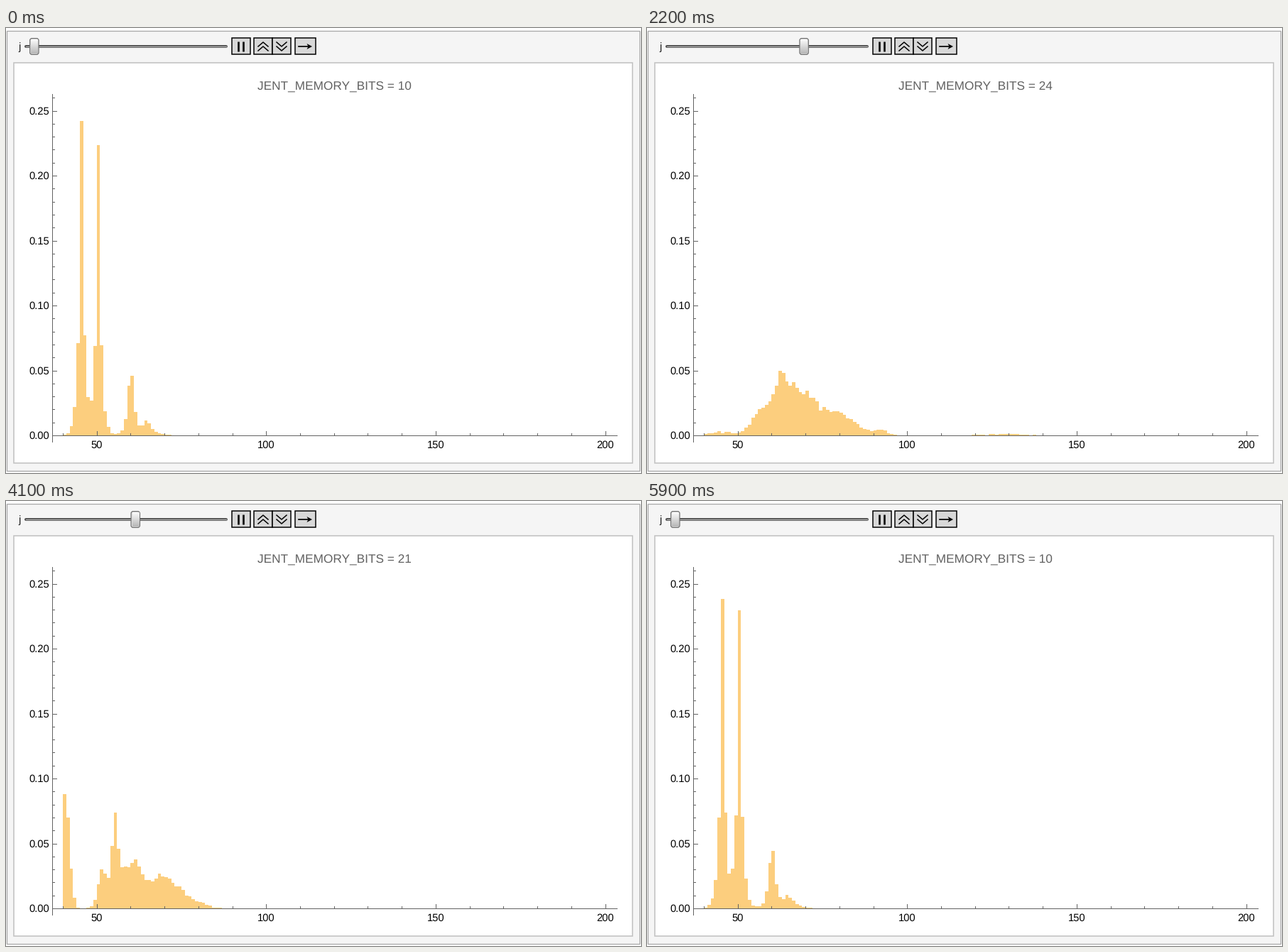
A matplotlib script for the animation above (6000 ms loop, 894 by 627 pixels).

```python
import math

import numpy as np
import matplotlib.pyplot as plt
from matplotlib.animation import FuncAnimation
from matplotlib.patches import FancyBboxPatch, Polygon, Rectangle

W, H, DPI = 894, 627, 100
FRAMES, INTERVAL = 60, 100
PT = 72 / DPI  # points per pixel
FLOOR, AXIS_X = 574, 65
GREY = "#626262"
BINS = np.arange(40, 200)

plt.rcParams["font.family"] = "Liberation Sans"
plt.rcParams["text.hinting"] = "none"


def px(value):
    return 127.7 + (value - 50) * 4.772


def py(prob):
    return FLOOR - prob * 1830


# ---- histogram: a few humps (centre, height in thousandths, width) ----

SPIKES = {
    10: [(45, 240, .83), (50, 225, .85), (59.6, 70, .9), (64.4, 13, 1.8)],
    13: [(40, 65, .5), (42, 27, 1), (47.6, 300, .68), (54, 206, .85),
         (57.5, 20, 1.8), (63, 24, .6), (67, 9, 2)],
    14: [(40, 67, .45), (45, 167, .8), (49.65, 285, .7), (54, 52, .9),
         (59.5, 52, .85), (64, 24, 1.1), (68, 5, 1)],
}
HILLS = {
    21: [(40, 91, 1.35), (51, 22, 1.2), (54.8, 45, .8), (57, 30, 3.4),
         (61.3, 13, 1.3), (65, 14, 4), (70, 15, 3.2), (76, 8, 4)],
    24: [(44, 2.5, 4), (56, 9, 2), (62.2, 14, 1.2), (64.5, 38, 5.6),
         (71, 5, 2), (78.5, 17, 5), (92, 3.5, 2), (128, 1.2, 5)],
    29: [(86, 1.6, 12), (119.7, 26, 1.5), (127.3, 28, 1.7),
         (134.7, 23, 1.8), (142, 17, 1.6), (145, 23, 6.5),
         (156.5, 9, 2.8), (164, 4, 4)],
}


def spike(d):
    return np.exp(-np.abs(d))


def hill(d):
    return np.exp(-d * d / 2)


def add_up(humps, shape):
    return sum(h * shape((BINS - c) / w) for c, h, w in humps)


KNOWN = {bits: add_up(humps, spike) for bits, humps in SPIKES.items()}
KNOWN |= {bits: add_up(humps, hill) for bits, humps in HILLS.items()}


def memory_bits(frame):
    """Hold at 10, climb to 30 and come back down, in whole steps."""
    return 10 + max(0, math.floor(0.84 * (25 - abs(frame - 29.6))))


def profile(bits):
    if bits > 29:
        return np.roll(KNOWN[29], 5)
    low = max(k for k in KNOWN if k <= bits)
    high = min(k for k in KNOWN if k >= bits)
    mix = (bits - low) / max(high - low, 1)
    if low == 24:
        # the share of cache hits halves with every bit
        mix = (1 - 2.0 ** (24 - bits)) / (1 - 2.0 ** -5)
    return (1 - mix) * KNOWN[low] + mix * KNOWN[high]


def heights(frame):
    """Every frame is a fresh sample, so the bars jitter a little."""
    h = profile(memory_bits(frame))
    noise = np.random.default_rng(frame).standard_normal(len(h))
    return np.maximum(h + 0.25 * np.sqrt(h) * noise, 0) / 1000


# ---- stage ----

fig = plt.figure(figsize=(W / DPI, H / DPI), dpi=DPI, facecolor="white")
ax = fig.add_axes([0, 0, 1, 1])
ax.axis("off")


def line(xs, ys, color="black", width=1.0, **kw):
    ax.plot(xs, ys, color=color, lw=width * PT, **kw)


def box(x0, y0, x1, y1, face, edge, width):
    ax.add_patch(Rectangle((x0, y0), x1 - x0, y1 - y0, facecolor=face,
                           edgecolor=edge, lw=width * PT))


def label(x, y, s, size, color="black", ha="center"):
    return ax.text(x, y, s, fontsize=size * PT, color=color, ha=ha,
                   va="baseline", zorder=5)


box(1, 4, 892, 624, "#f5f5f5", "#a8a8a8", 1.3)
box(11, 48.5, 882, 613, "white", "#c2c2c2", 1.6)

# slider track
label(18.7, 30.5, "j", 15, "#222222")
line([28, 310], [26, 26], "#505050", 4, solid_capstyle="round")
line([28, 310], [26, 26], "#b4b4b4", 1.4, solid_capstyle="round")

# buttons: pause, faster, slower, direction
for left, right in ((318, 344), (349, 375), (375, 401), (407, 436)):
    box(left, 14, right, 37, "#d8d8d8", "black", 1.5)
for x in (327, 334):
    line([x, x], [19, 33], width=2.6, solid_capstyle="butt", zorder=4)
for x, tip, rise in ((362, 20, 6), (388, 32, -6)):
    for y in (tip, tip + rise):
        line([x - 7, x, x + 7], [y + rise, y, y + rise], width=1.5, zorder=4)
line([411.5, 427], [26, 26], width=1.7, zorder=4)
ax.add_patch(Polygon([(431, 26), (423.5, 22), (425.5, 26), (423.5, 30)],
                     color="black", lw=0, zorder=4))

# plot axes
line([AXIS_X, 860], [FLOOR, FLOOR], GREY, zorder=4)
line([AXIS_X, AXIS_X], [93, 583], GREY, zorder=4)
for value in range(40, 201, 10):
    major = value % 50 == 0
    x = px(value)
    line([x, x], [FLOOR, FLOOR - (6 if major else 3)], GREY, zorder=4)
    if major:
        label(x + 0.2, 591.7, str(value), 14.8)
for step in range(27):
    major = step % 5 == 0
    y = py(step / 100)
    line([AXIS_X, AXIS_X + (6 if major else 3)], [y, y], GREY, zorder=4)
    if major:
        label(61, y + 5, f"{step / 100:.2f}", 14.8, ha="right")

title = label(462, 87.3, "", 17.2, GREY)
hist = ax.stairs(py(heights(0)), px(np.append(BINS, 200)), baseline=FLOOR,
                 fill=True, color="#fcce7e", lw=0, zorder=3)

thumb = FancyBboxPatch((33.6, 14.6), 12.4, 22.8, zorder=5, lw=1.2 * PT,
                       boxstyle="round,pad=0,rounding_size=3",
                       facecolor="#dcdcdc", edgecolor="#707070")
ax.add_patch(thumb)
shade = ax.imshow(np.linspace(0.98, 0.72, 24)[:, None], cmap="gray", vmin=0,
                  vmax=1, extent=(35, 44, 36, 16), aspect="auto", zorder=6)


def draw(frame):
    bits = memory_bits(frame)
    x = 39.8 + 12.95 * (bits - 10)
    thumb.set_x(x - 6.2)
    shade.set_extent((x - 4.7, x + 4.7, 36, 16))
    ax.set_xlim(0, W)
    ax.set_ylim(H, 0)
    title.set_text(f"JENT_MEMORY_BITS = {bits}")
    hist.set_data(values=py(heights(frame)))
    return thumb, shade, title, hist


anim = FuncAnimation(fig, draw, frames=FRAMES, interval=INTERVAL,
                     repeat=True, repeat_delay=0, blit=False)
plt.show()
```
